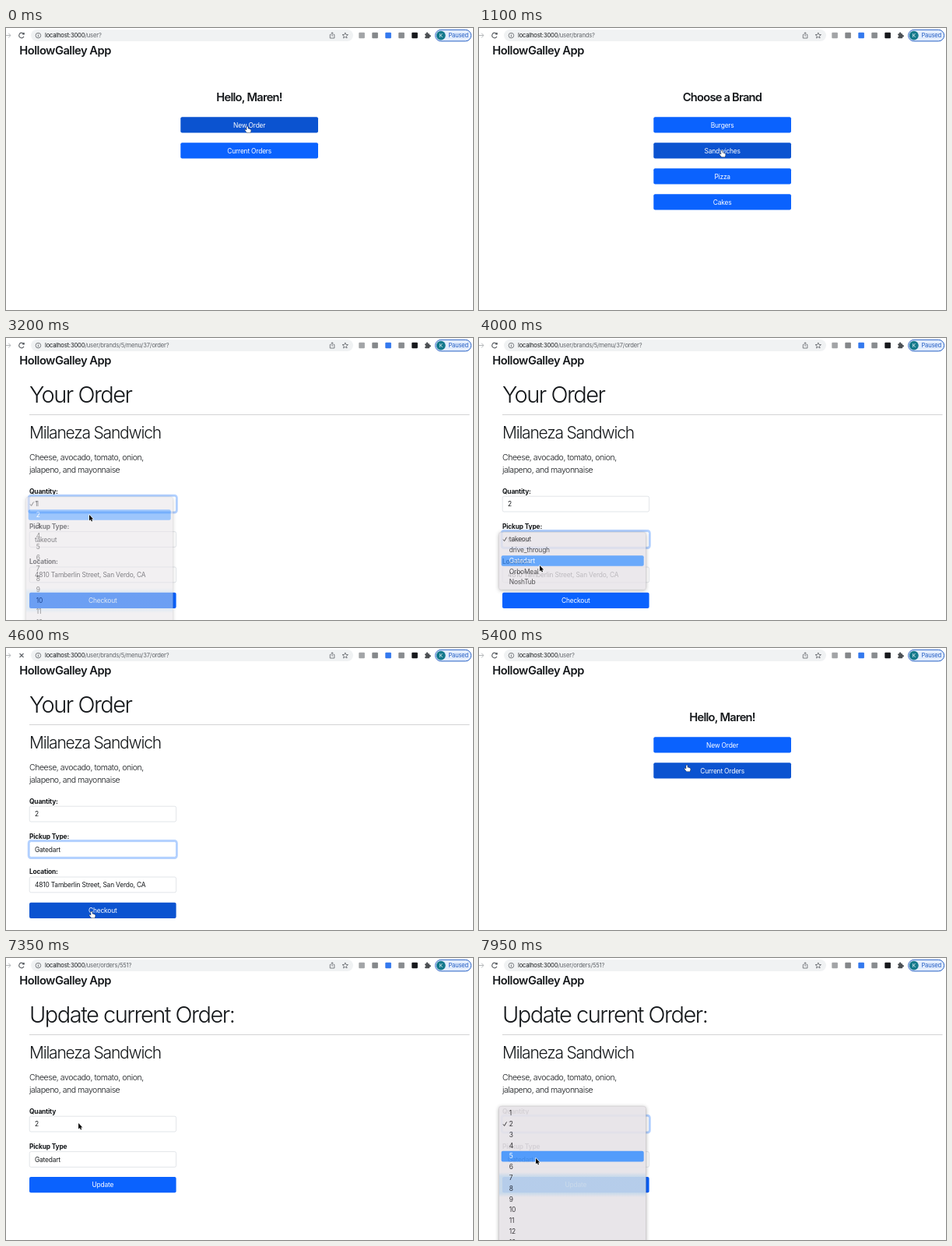
Recreate the animation shown at these times as an HTML page with a canvas. Size 600 px wide and 362 px high, loop 8000 ms.

```html
<!DOCTYPE html>
<html lang="en">
<head>
<meta charset="utf-8">
<title>Ordering app</title>
<style>
html, body { margin: 0; width: 100%; height: 100%; overflow: hidden; background: #fff; }
canvas { display: block; width: 600px; height: 362px; }
</style>
</head>
<body>
<canvas id="stage"></canvas>
<script>
const W = 600, H = 362, LOOP = 8000;
const BLUE = '#0a62fe', BLUE_HOVER = '#0b53d0', RED = '#d92c3c', INK = '#15181b';
const dpr = window.devicePixelRatio || 1;

function sized(canvas) {
  canvas.width = W * dpr;
  canvas.height = H * dpr;
  return canvas.getContext('2d');
}

const stage = sized(document.getElementById('stage'));
const layer = sized(document.createElement('canvas'));
let ctx = stage;

// Pointer path: time, x, y of the tip
const path = [
  [0, 310, 126], [400, 310, 126], [850, 312, 157], [1250, 312, 157],
  [1650, 556, 176], [1850, 561, 172], [2150, 561, 172], [2500, 150, 190],
  [2750, 110, 212], [2850, 110, 212], [3020, 107, 227], [3300, 107, 227],
  [3550, 90, 257], [3650, 88, 258], [3900, 78, 292], [4100, 78, 292],
  [4400, 110, 338], [4700, 110, 338], [5100, 215, 185], [5400, 267, 150],
  [5520, 278, 155], [5700, 278, 155], [5940, 470, 301], [6350, 501, 296],
  [6900, 501, 296], [7280, 95, 212], [7400, 92, 212], [7650, 76, 232],
  [7850, 73, 257], [8000, 73, 257]
];

const scenes = [
  { at: 0, url: '/user?', draw: homePage },
  { at: 450, url: '/user/brands?', draw: brandsPage },
  { at: 1300, url: '/user/brands/5/menu?', draw: menuPage },
  { at: 2150, url: '/user/brands/5/menu/37/order?', draw: orderPage },
  { at: 4700, url: '/user?', draw: homePage },
  { at: 5700, url: '/user/orders?', draw: ordersPage },
  { at: 6900, url: '/user/orders/551?', draw: updatePage }
];

const FADE = 180;
const numbers = Array.from({ length: 14 }, (_, i) => String(i + 1));
const pickups = ['takeout', 'drive_through', 'Gatedart', 'OrboMeal', 'NoshTub'];
const quantityMenu = { open: 2800, click: 3115, top: 204, items: numbers, checked: 0, glow: 337 };
const pickupMenu = { open: 3600, click: 3965, top: 249.3, items: pickups, checked: 0 };
const updateMenu = { open: 7400, click: 7936, top: 190.3, items: numbers, checked: 1, glow: 291 };
const menus = [quantityMenu, pickupMenu, updateMenu];

const orders = [
  [['Burger Special'], ['Dill pickle, cheddar cheese, tomato, red onion, ground chuck'], '3', '$29.97', 'Gatedart'],
  [['BBQ'], ['Beef, sauce, seasoning'], '1', '$50', 'Takeout'],
  [['Velvet Cake'], ['lemon raspberry cake'], '2', '$9.98', 'OrboMeal'],
  [['Veggie Pizza'], ['Fresh mushrooms, fresh tomatoes, bell peppers, black olives', '& red onions'], '2', '$45.98', 'Gatedart'],
  [['Basic Beef', 'Burger'], ['Norle beef mince, tomato sauce, cheddar cheese,', 'worcestershire'], '5', '$62.5', 'Drive_through'],
  [['Milaneza', 'Sandwich'], ['Cheese, avocado, tomato, onion, jalapeno, and mayonnaise'], '2', '$17.98', 'Gatedart']
];

let now = 0, tip = { x: 0, y: 0 }, overButton = false, menuOpen = null;

function pointerAt(t) {
  const i = Math.max(1, path.findIndex(p => p[0] > t));
  const [t0, x0, y0] = path[i - 1], [t1, x1, y1] = path[i];
  const u = (t - t0) / (t1 - t0), k = u * u * (3 - 2 * u);
  return { x: x0 + (x1 - x0) * k, y: y0 + (y1 - y0) * k };
}

// y is the middle of the capitals
function text(s, x, y, { size = 8.42, weight = 400, color = INK, align = 'left', track = -0.023 } = {}) {
  ctx.font = `${weight} ${size}px Inter, sans-serif`;
  ctx.letterSpacing = `${track * size}px`;
  ctx.textAlign = align;
  ctx.fillStyle = color;
  ctx.fillText(s, x, y + size * 0.36);
  return ctx.measureText(s).width;
}

function box(x, y, w, h, r, fill, stroke, line = 0.6) {
  ctx.beginPath();
  ctx.roundRect(x, y, w, h, r);
  if (fill) { ctx.fillStyle = fill; ctx.fill(); }
  if (stroke) { ctx.strokeStyle = stroke; ctx.lineWidth = line; ctx.stroke(); }
}

function stroke(points, color, line = 1) {
  ctx.beginPath();
  points.forEach(([x, y]) => ctx.lineTo(x, y));
  ctx.strokeStyle = color;
  ctx.lineWidth = line;
  ctx.stroke();
}

function disc(x, y, r, fill) {
  ctx.beginPath();
  ctx.arc(x, y, r, 0, 7);
  ctx.fillStyle = fill;
  ctx.fill();
}

const inside = (x, y, w, h) => tip.x >= x && tip.x < x + w && tip.y >= y && tip.y < y + h;

function button(label, x, y, w, fill = BLUE) {
  const hover = !menuOpen && inside(x, y, w, 20);
  if (hover) overButton = true;
  box(x, y, w, 20.2, 2, hover ? BLUE_HOVER : fill);
  text(label, x + w / 2, y + 10.3, { color: '#fff', align: 'center' });
}

function heading(s) {
  text(s, 30, 72.5, { size: 29, weight: 350, track: -0.052 });
}

const bold = (s, x, y) => text(s, x, y, { weight: 700 });

function greeting(s) {
  text(s, 312.5, 89, { size: 14.7, weight: 600, align: 'center', track: -0.053 });
}

function homePage() {
  greeting('Hello, Maren!');
  button('New Order', 224.3, 114.2, 176.7);
  button('Current Orders', 224.3, 147.2, 176.7);
}

function brandsPage() {
  greeting('Choose a Brand');
  ['Burgers', 'Sandwiches', 'Pizza', 'Cakes'].forEach((s, i) => button(s, 224.3, 114.2 + i * 33, 176.7));
}

function tableHead(cols) {
  cols.forEach(([s, x]) => bold(s, x, 113.6));
  ctx.fillStyle = INK;
  ctx.fillRect(30, 123.7, 565.5, 1.1);
}

function rowBack(y, h) {
  if (inside(30, y, 565.5, h)) {
    ctx.fillStyle = '#e7e7e7';
    ctx.fillRect(30, y, 565.5, h);
  }
  ctx.fillStyle = '#dcdfe2';
  ctx.fillRect(30, y + h - 0.6, 565.5, 0.6);
}

function menuPage() {
  heading('Menu');
  tableHead([['Name', 34.5], ['Description', 157], ['Calories', 452], ['Price', 505]]);
  const rows = [['Beef (Asada) Sandwich', '350', '$9.99'], ['Milaneza Sandwich', '250', '$8.99']];
  rows.forEach(([name, calories, price], i) => {
    const y = 124.7 + i * 29.1;
    rowBack(y, 29.1);
    text(name, 34.5, y + 11);
    text('Cheese, avocado, tomato, onion, jalapeno, and mayonnaise', 157, y + 11);
    text(calories, 452, y + 11);
    text(price, 505, y + 11);
    button('Order', 544, y + 4.4, 36);
  });
}

function ordersPage() {
  heading('Your current Orders');
  tableHead([['Name', 34.5], ['Description', 108.5], ['Quantity', 349.5], ['Total', 393.5], ['Pickup Type', 429.5]]);
  let y = 124.7;
  for (const [name, about, count, total, pickup] of orders) {
    const h = Math.max(name.length, about.length) > 1 ? 34.4 : 29.1;
    rowBack(y, h);
    name.forEach((s, i) => text(s, 34.5, y + 11 + i * 12.6));
    about.forEach((s, i) => text(s, 108.5, y + 11 + i * 12.6));
    text(count, 349.5, y + 11);
    text(total, 393.5, y + 11);
    text(pickup, 429.5, y + 11);
    button('UPDATE', 492.5, y + 4.4, 45.5);
    button('DELETE', 546.5, y + 4.4, 44.5, RED);
    y += h;
  }
  button('Home', 30, 324, 169.5);
}

function dish(title) {
  heading(title);
  ctx.fillStyle = '#c8c9ca';
  ctx.fillRect(30, 98, 565.5, 0.8);
  text('Milaneza Sandwich', 30, 121, { size: 21, weight: 350, track: -0.057 });
  ['Cheese, avocado, tomato, onion,', 'jalapeno, and mayonnaise'].forEach((s, i) =>
    text(s, 30, 153.6 + i * 15.9, { size: 10.5, weight: 350, track: -0.043 }));
}

function field(label, value, y, focused) {
  bold(label, 30, y - 6.5);
  if (focused) box(29, y - 1, 190.5, 22.2, 3, null, '#b5d2ff', 2.6);
  box(30.2, y + 0.2, 188.4, 19.8, 2, '#fff', focused ? '#86b7fe' : '#ced4da');
  text(value, 37, y + 10.2);
}

function orderPage() {
  const picked = now >= pickupMenu.click + FADE;
  const onPickup = now >= pickupMenu.open;
  dish('Your Order');
  field('Quantity:', now < quantityMenu.click + FADE ? '1' : '2', 203, now >= quantityMenu.open && !onPickup);
  field('Pickup Type:', pickups[picked ? 2 : 0], 248.4, onPickup);
  field('Location:', '4810 Tamberlin Street, San Verdo, CA', 293.8, false);
  button('Checkout', 30, 326.7, 188.6);
}

function updatePage() {
  dish('Update current Order:');
  field('Quantity', '2', 203, now >= updateMenu.open);
  field('Pickup Type', 'Gatedart', 248.4, false);
  button('Update', 30, 281, 188.6);
}

function dropdown({ top, items, checked, glow }) {
  const pitch = 13.78, h = items.length * pitch + 5;
  ctx.shadowColor = 'rgba(0,0,0,.35)';
  ctx.shadowBlur = 5 * dpr;
  ctx.shadowOffsetY = dpr;
  box(25.5, top, 189, h, 3, '#e7e3e8');
  ctx.shadowColor = 'transparent';
  box(25.5, top, 189, h, 3, null, 'rgba(0,0,0,.14)', 0.5);
  if (glow) {
    const g = ctx.createLinearGradient(0, glow - 16, 0, glow + 16);
    [[0, 0], [0.16, 0.55], [0.84, 0.55], [1, 0]].forEach(([p, a]) => g.addColorStop(p, `rgba(170,205,234,${a})`));
    ctx.fillStyle = g;
    ctx.fillRect(26, glow - 16, 188, 32);
  }
  items.forEach((s, i) => {
    const y = top + 9 + i * pitch;
    const on = inside(25, y - pitch / 2, 190, pitch);
    if (on) box(28.7, y - 6.6, 183, 13.6, 2, '#4494fb');
    const color = on ? '#fff' : '#29282a';
    if (i === checked) stroke([[31, y + 0.3], [32.6, y + 2.4], [35.5, y - 2.6]], color);
    text(s, 38.8, y, { color });
  });
}

// Draws the menu on its own layer so that it fades as one sheet
function fadingMenu(menu) {
  ctx = layer;
  ctx.setTransform(dpr, 0, 0, dpr, 0, 0);
  ctx.clearRect(0, 0, W, H);
  dropdown(menu);
  ctx = stage;
  ctx.globalAlpha = now < menu.click ? 1 : 1 - (now - menu.click) / FADE;
  ctx.drawImage(layer.canvas, 0, 0, W, H);
  ctx.globalAlpha = 1;
}

function browserBar(url, loading) {
  const grey = '#5f6368';
  stroke([[0, 9.5], [6, 9.5]], '#b4b7ba');
  stroke([[3.2, 6.7], [6, 9.5], [3.2, 12.3]], '#b4b7ba');
  if (loading) {
    stroke([[17.5, 7], [22.5, 12]], grey, 1.1);
    stroke([[22.5, 7], [17.5, 12]], grey, 1.1);
  } else {
    ctx.beginPath();
    ctx.arc(20, 9.5, 3.2, 0.4, 5.6);
    ctx.strokeStyle = grey;
    ctx.lineWidth = 1.1;
    ctx.stroke();
    ctx.fillStyle = grey;
    ctx.fillRect(21.1, 6, 2.7, 2.6);
  }
  box(32, 2, 414, 15, 7.5, '#f0f2f3');
  box(38.1, 6.3, 6.6, 6.6, 3.3, null, grey, 0.8);
  stroke([[41.4, 9.1], [41.4, 11.4]], grey, 0.9);
  stroke([[41.4, 7.5], [41.4, 8.3]], grey, 0.9);
  const host = text('localhost:3000', 50, 9.7, { size: 7.6 });
  text(url, 50 + host, 9.7, { size: 7.6, color: grey });

  stroke([[417.5, 8.5], [416.3, 8.5], [416.3, 13], [421.9, 13], [421.9, 8.5], [420.7, 8.5]], grey, 0.8);
  stroke([[419.1, 10.7], [419.1, 5.8]], grey, 0.8);
  stroke([[417.5, 7.3], [419.1, 5.7], [420.7, 7.3]], grey, 0.8);
  const star = Array.from({ length: 11 }, (_, i) => {
    const a = i * Math.PI / 5 - Math.PI / 2, r = i % 2 ? 1.7 : 3.9;
    return [435.8 + r * Math.cos(a), 9.8 + r * Math.sin(a)];
  });
  stroke(star, grey, 0.8);

  ['#a3a5a7', '#85888b', '#3479ee', '#898c8f', '#17191d'].forEach((c, i) =>
    box(453.3 + i * 17, 5.7, 7.6, 7.6, 1, c));
  box(538.2, 7.2, 6, 6, 0.8, '#4b4f53');
  disc(541.1, 6.8, 1.3, '#4b4f53');
  disc(544.6, 10.2, 1.3, '#4b4f53');
  disc(538.3, 10.2, 1, '#fff');

  box(551.6, 2.3, 46, 14.6, 7.3, '#e3edfd', '#2861c4', 1);
  disc(558.8, 9.6, 5.9, '#14798c');
  text('K', 558.8, 9.6, { size: 6.5, color: '#fff', align: 'center' });
  text('Paused', 568.4, 9.7, { size: 7.6, color: '#1f5ac2' });
}

function pointer() {
  ctx.save();
  ctx.translate(tip.x, tip.y);
  ctx.lineJoin = 'round';
  const shape = overButton
    ? new Path2D('M-.8 .7Q0-.4 .8 .7V3.2L2.4 3.5 4 4.2Q5 4.6 4.7 6L4 8.4H-.3L-2.7 5.4Q-3.2 4.2-2 4.4L-.8 5.2Z')
    : new Path2D('M0 0V7.4L1.7 5.9 2.9 8.6 4.1 8.1 2.9 5.4H5.2Z');
  ctx.fillStyle = overButton ? '#fff' : '#000';
  ctx.strokeStyle = overButton ? '#111' : '#fff';
  ctx.lineWidth = overButton ? 0.8 : 1.3;
  ctx.stroke(shape);
  ctx.fill(shape);
  ctx.restore();
}

function render(t) {
  now = t;
  tip = pointerAt(t);
  overButton = false;
  menuOpen = menus.find(m => t >= m.open && t < m.click + FADE);
  const scene = scenes.findLast(s => t >= s.at);
  const loading = scenes.some(s => t < s.at && t >= s.at - 120);
  ctx.setTransform(dpr, 0, 0, dpr, 0, 0);
  ctx.fillStyle = '#fff';
  ctx.fillRect(0, 0, W, H);
  browserBar(scene.url, loading);
  text('HollowGalley App', 17.3, 28.9, { size: 14.7, weight: 600, track: -0.034 });
  scene.draw();
  if (menuOpen) fadingMenu(menuOpen);
  pointer();
}

const start = performance.now();
function tick() {
  render((performance.now() - start) % LOOP);
  requestAnimationFrame(tick);
}
tick();
</script>
</body>
</html>
```
